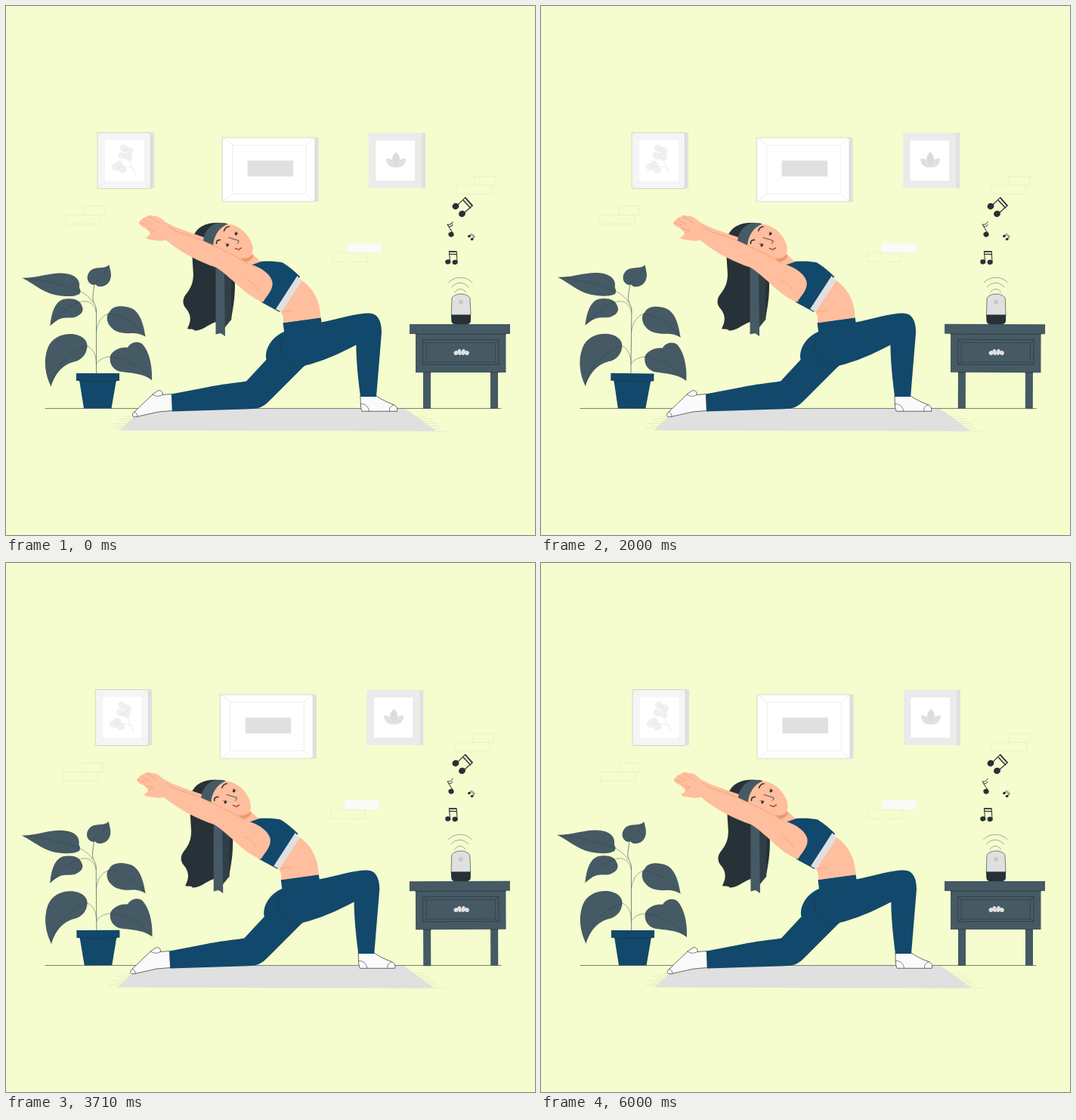
An HTML page with a canvas that plays this animation: 700x700 px, repeating every 6040 ms.

```html
<!DOCTYPE html>
<html lang="en">
<head>
<meta charset="utf-8">
<title>Yoga at home</title>
<style>
  html, body { margin: 0; width: 100%; height: 100%; overflow: hidden; background: #f5fccd; }
  canvas { display: block; width: 700px; height: 700px; }
</style>
</head>
<body>
<canvas id="stage" width="700" height="700"></canvas>
<script>
const ctx = document.getElementById('stage').getContext('2d');
const LOOP = 6040;
const BG = '#f5fccd', BLUE = '#12486b', SLATE = '#455a64', DARK = '#263238';
const SKIN = '#ffbe9d', SHADE = '#eb996e', GREY = '#e0e0e0', PALE = '#ebebeb', OFF = '#f5f5f5', SOCK = '#fafafa';

const cache = {};
const path = d => cache[d] || (cache[d] = new Path2D(d));

function fill(d, color) {
  ctx.fillStyle = color;
  ctx.fill(path(d));
}
function line(d, color = DARK, width = 0.6) {
  ctx.strokeStyle = color;
  ctx.lineWidth = width;
  ctx.stroke(path(d));
}
function shape(d, color, edge = DARK, width = 0.7) {
  fill(d, color);
  line(d, edge, width);
}
function rect(x, y, x2, y2, color) {
  ctx.fillStyle = color;
  ctx.fillRect(x, y, x2 - x, y2 - y);
}
function box(x, y, x2, y2, color, width = 0.6) {
  ctx.strokeStyle = color;
  ctx.lineWidth = width;
  ctx.strokeRect(x, y, x2 - x, y2 - y);
}
function oval(x, y, rx, ry, turn, color) {
  ctx.fillStyle = color;
  ctx.beginPath();
  ctx.ellipse(x, y, rx, ry, turn, 0, Math.PI * 2);
  ctx.fill();
}

// Linear interpolation through [position, value] stops, position in 0..1
function track(stops, p) {
  for (let i = 1; i < stops.length; i++) {
    const [a, u] = stops[i - 1], [b, v] = stops[i];
    if (p <= b) return u + (v - u) * (p - a) / (b - a);
  }
  return stops[stops.length - 1][1];
}
const slide = [[0, 0], [.2, 1.9], [.4, -2.4], [.6, -2.85], [.8, -1.4], [1, 0]];
const wind = [[0, 0], [.25, 1], [.75, -1], [1, 0]];
const wobble = [[0, 0], [.2, -.85], [.4, .7], [.6, -.2], [.8, -.3], [1, 0]];
const beat = [[0, 1], [.1, 1.1], [.15, 1], [.485, 1], [.6, 1.1], [.65, 1], [1, 1]];

function around(x, y, deg, scale, draw) {
  ctx.save();
  ctx.translate(x, y);
  ctx.rotate(deg * Math.PI / 180);
  ctx.scale(scale, scale);
  ctx.translate(-x, -y);
  draw();
  ctx.restore();
}

function corners(x, y, x2, y2, a, b, c, d, color, width) {
  line(`M${x},${y}L${a},${b}M${x2},${y}L${c},${b}M${x},${y2}L${a},${d}M${x2},${y2}L${c},${d}`, color, width);
}

function wall() {
  // left picture
  rect(191.5, 167.5, 196, 241, GREY);
  rect(121.5, 167.5, 191.5, 241.5, OFF);
  box(121.5, 167.5, 191.5, 241.5, '#c6c9c0', 0.7);
  rect(131, 177.5, 182.5, 231.5, '#fff');
  corners(121.5, 167.5, 191.5, 241.5, 131, 177.5, 182.5, 231.5, GREY, 0.5);
  line('M162,200C165,209 169,217 172,224M170,216C164,212 157,212 148,213', '#e6e6e6', 0.7);
  for (const [x, y, r] of [[156, 188, 5.5], [163, 192, 6], [154, 198, 5.5], [162, 200, 5.5], [150, 209, 5], [145, 213, 5.5], [154, 216, 6]])
    oval(x, y, r, r * .85, .4, 'rgba(234,234,234,.7)');

  // middle picture
  rect(409, 174, 413.5, 259, GREY);
  rect(286.5, 174, 409, 259, '#fff');
  box(286.5, 174.2, 409, 258.8, '#cfd2c8', 0.8);
  box(300, 184.3, 397, 248.5, '#e8e8e8', 0.7);
  corners(286.5, 174, 409, 259, 300, 184, 397, 248.5, '#d8d8d8', 0.5);
  rect(319.5, 204.5, 380, 225.5, GREY);

  // right picture
  rect(550, 168, 555, 241, GREY);
  rect(480, 168, 550, 241, PALE);
  rect(489.5, 178, 541, 231, '#fff');
  fill('M503,202C509,201 515,205 516,213.5C509,214.5 503,210 503,202Z', GREY);
  fill('M529,202C523,201 517,205 516,213.5C523,214.5 529,210 529,202Z', GREY);
  shape('M516,193C523,199 523,207 516,213.5C509,207 509,199 516,193Z', '#dcdcdc', '#f2f2f2', 0.5);

  // bricks
  const brick = '#e5e9d0';
  box(104, 264.5, 131, 276.5, brick);
  box(79, 276.5, 125, 288.5, brick);
  box(620, 225.5, 648, 237.3, brick);
  box(596.5, 237.3, 643, 249, brick);
  rect(451.5, 314, 497, 326, SOCK);
  line('M478,326.3H432.5V338.5H447M478,326V338.5H455', brick);
}

function mat() {
  fill('M150,561.5L181,533H529L570,562.8Z', GREY);
  line('M139,558.5H158M146,555.5H161M142,552.5H164M153,549.5H168M149,546.5H171M158,543.5H174M570,562.7H584M562,559H575M558,555.5H572M554,552.5H570M550,549.5H564M546,546.5H562M543,543H556', '#dfe3c8', 0.6);
}

function legs() {
  shape('M219,513.5L207,514.5C208,510 204,508 201,509L194,514L169,538C166,541 167,544.5 172,543.7L202,537L220,535.5Z', SOCK);
  line('M194,514C198,517 203,517 207,514.5M170,537C172,538 174,540 174,543');
  shape('M469,516.5L490,516C496,520 505,525 513,527.5C518,530 518,533 517.5,536.3H471C468.5,531 469.5,523 469,516.5Z', SOCK);
  line('M469.5,526.5C475,526 480,530 480.5,536M513,528C509,529 507,532 507.5,536');

  fill('M219,513.5L266,504.5C285,500.5 302,499 318,496.5L344.5,468L395,476L352,519C342,529 338,533 323,533.2L220,536.5Z', BLUE);
  fill('M366.5,419L416.5,412L417.5,418.5C440,414 464,406.5 480,406.5C491,406.5 497,415 497,432L490,517H469C466,494 463.5,470 463.3,448.5C440,461 416,471 395,476L375,490L344.5,468C342,455 350,439 368,431Z', BLUE);
  line('M366,437C359,449 362,470 380,476C385,477.5 390,477 395,476', DARK, 0.5);
}

function torso() {
  fill('M388,361C405,371 416,389 416.5,412.5L367.3,419.3C367,413 367,408 363,404Z', SKIN);
  line('M366,405C371,403 375,403 379,403', SHADE, 0.6);
  fill('M319,340.5C331,337.5 353,336.5 366,339.5C375,345 382,351 389,358L362,405L338,392Z', BLUE);
  fill('M385.5,357L391.3,364L364.5,405L357,401Z', GREY);
}

function head() {
  // hair
  fill('M293,288C272,284 253,289 248,305C245,320 247,337 247.5,349C249,362 246,371 240,379C233,387 233,394 238,400C243,406 247,414 240,427C246,429 250,427 249,429.5C260,430 266,422 278,418L290,425.5L292,416H298C300,398 305,385 302,348L288,310Z', DARK);
  fill('M289,345L301,350C296,370 299,400 298,415L290,425Z', '#303f46');
  fill('M277.5,335L289,342L290,437L284,433L277.5,434.5Z', SLATE);

  // far arm
  fill('M207,284L225,293L250,302L268,308L284,322L250,325L208,306Z', SKIN);

  // neck and face
  fill('M308,320L326,328L337,338.5L315,346L296,336Z', SKIN);
  fill('M311,333C318,335 324,332 326.5,328L326.5,333C323,337 319,339 315,338.5Z', SHADE);
  fill('M292,288.5C306,289 316,298 321,306C327,315 328,323 325,329C321,334 314,335 308,332L300,336L270,322C270,303 280,291 292,288.5Z', SKIN);
  fill('M277,288C283,286.5 289,286.5 293.5,288.5C282,293 275,304 274,317L261,311C262,300 268,292 277,288Z', SLATE);
  line('M288.5,297.5C290,293.5 292,292 295,292', DARK, 1.6);
  line('M278.5,314.5C278,311 280,309.5 283.5,309.5', DARK, 1.6);
  oval(304.3, 301.5, 1.6, 2, .5, DARK);
  oval(293, 316.5, 1.6, 2, .5, DARK);
  line('M303,299C305,299 307,300 307,302M290,314.5C292,314 294,314.5 295.5,316', DARK, 0.5);
  line('M295,306.5L308,310.5C308,312.5 307,314 306,314.5', DARK, 0.8);
  line('M303,320.5C306,322.5 309,322.5 311.5,320', '#8f3b2d', 1.1);
  fill('M304.5,321.5C306,322.5 309,322.5 310.5,321L308,324Z', '#df6a54');
}

function arms() {
  fill('M176,288C176,284 180,283 181,281C184,279 187,279 188,277.5C193,276 194,279 198,278C204,279 210,284 215,291L252,307C276,317 302,330 321,341C336,345 350,354 352.5,365C354,376 345,383 340,392C326,387 314,376 305,368C294,358 285,350 278,346C257,339 232,327 212,310C206,311 198,311 194,309.5C188,309 184,307.5 186,305.5C189,304 191,303 191,300L185,294C181,293 178,291 176,288Z', SKIN);
  line('M215,291C218,297 231,300 252,307C276,317 302,330 321,341', SHADE, 0.7);
  line('M177,287L187,290M181,282L193,289M188,278C194,281 197,284 203,287M186,294L197,297M191,300C195,299 197,297 198,295M319,362C325,366 331,370 334,376', SHADE, 0.6);
}

function plant() {
  line('M119.5,486V402C119,395 114,392 115,384C115,378 117,373 117,366', SLATE, 0.7);
  line('M97,377C104,380 112,386 115,392M101,391C112,389 118,397 119.5,406M136,407C126,410 121,419 119.5,431M107,450C114,452 119,460 119.5,472M138,464C129,464 122,469 119.5,474', SLATE, 0.5);
  fill('M22,360C43,359.5 55,353.5 73,353.5C90,354 99,361 97,373C100,377 98,382 95,382C90,384.5 82,384.5 72,383.5C52,381.5 42,371 22,360Z', SLATE);
  fill('M136.5,342.5C131,348 121,345 114,348.5C107,353 106,361 110,366C114,370 117,369 118.5,368.5C122,373 130,372 135,367C142,359 138,350 136.5,342.5Z', SLATE);
  fill('M58.5,423C60,406 65,391 76,388C88,385.5 98,389 100,396C104,402 100,408 95,410C91,413 87,412.5 82,412.5C71,412 66,417 58.5,423Z', SLATE);
  fill('M184.5,437.5C182,420 177,405 166,400C153,395 140,397 137,405C132,408 133,419 138,424C145,433.5 159,433.5 167,433C175,433 180,435 184.5,437.5Z', SLATE);
  fill('M59.5,503.5C52,488 49,470 55,453C60,440 72,434 85,434C98,434 108,441 107.5,450C107,460 101,467 93,470C78,473 66,483 59.5,503.5Z', SLATE);
  fill('M193,495C194,478 190,457 180,447C173,442 164,446 161,452C151,451 141,456 138,463C136,472 141,481 150,483.5C163,486 180,485 193,495Z', SLATE);
  line('M22,360C48,362 72,368 97,377M136,343C132,353 125,361 117,366M58,423C70,407 84,395 101,391M185,437C172,421 155,409 136,407M59,503C65,477 82,459 107,450M193,495C180,478 160,466 138,464', 'rgba(38,50,56,.7)', 0.4);

  fill('M97,495H146L139.5,532.5H103Z', BLUE);
  rect(93, 486, 150, 496, BLUE);
  line('M97,496.3H146', DARK, 0.6);
}

function table(turn) {
  rect(552, 484, 562, 533, SLATE);
  rect(641, 484, 651, 533, SLATE);
  rect(542, 433, 661.5, 485, SLATE);
  rect(534, 421, 667, 434, SLATE);
  line('M542,434.2H661.5M552,485H562M641,485H651', DARK, 0.7);
  box(552, 441.5, 652, 474.5, DARK, 0.6);
  box(556.5, 445.5, 647.5, 471, DARK, 0.5);
  corners(552, 441.5, 652, 474.5, 556.5, 445.5, 647.5, 471, DARK, 0.5);
  for (const side of [-1, 1]) {
    oval(602.7 + side * 7, 459, 3.2, 2.8, side * .5, GREY);
    oval(602.7 + side * 2.4, 458, 2.4, 4, side * .2, GREY);
  }

  shape('M589.3,409L590,386.5C591,384 596,381.5 599,381.2H605C608,381.5 613,384 614,386.5L615,409Z', GREY, DARK, 0.6);
  fill('M589,408.5H615V416C615,420 612,421.3 608,421.3H596C592,421.3 589.5,420 589.3,416Z', DARK);
  oval(602, 392, 3, 3, 0, '#c6c6c6');
  ctx.save();
  ctx.translate(turn * 1.5, 0);
  line('M585.5,366C594,357 609,357 617,366M589.5,372C596,364.5 606,364.5 612.5,372M594,379C598,373 605,373 608.5,379', SLATE, 0.5);
  ctx.restore();
}

function notes() {
  oval(595, 265, 4.5, 4.1, -.3, DARK);
  oval(603.5, 275, 4.5, 4.1, -.3, DARK);
  line('M598,263L607.8,253.3L617.3,264L606.5,273.5', DARK, 1.1);
  line('M607.8,254L616.8,264.2M605.3,257.3L614.5,267', DARK, 1.5);

  oval(589, 302.3, 3.6, 3.4, -.3, DARK);
  line('M591.5,301L584,289C587,289.5 590.5,288.5 591,285.5M585.8,292C588,292 590,291.5 591,289.5', DARK, 1);

  oval(613, 304.5, 2, 1.7, -.3, DARK);
  oval(616.7, 308.5, 2, 1.7, -.3, DARK);
  line('M614,303.5L616.3,301.3L620.3,304.8L618,307.5M615.5,302.7L619.3,306', DARK, 0.7);

  oval(584.8, 338.5, 3.6, 3.2, -.2, DARK);
  oval(594.2, 339, 3.6, 3.2, -.2, DARK);
  line('M587.5,338L586.5,324.8L596.2,325L597,338.5', DARK, 1);
  line('M586.5,325L596.2,325.2M586.7,328.4L596.4,328.6', DARK, 1.4);
}

function render(ms) {
  const p = (ms % LOOP) / LOOP;
  ctx.fillStyle = BG;
  ctx.fillRect(0, 0, 700, 700);
  line('M52,532.5H655', DARK, 0.6);

  ctx.save();
  ctx.translate(track(slide, p), 0);
  wall();
  mat();
  legs();
  torso();
  head();
  arms();
  ctx.restore();

  around(107.5, 437.5, track(wind, p), 1, plant);
  const turn = track(wobble, p);
  around(600.5, 457, turn, 1, () => table(turn));
  around(600.5, 297.5, 0, track(beat, p * 4 % 1), notes);
}

ctx.lineCap = ctx.lineJoin = 'round';
const start = performance.now();
function tick() {
  render(performance.now() - start);
  requestAnimationFrame(tick);
}
tick();
</script>
</body>
</html>
```
